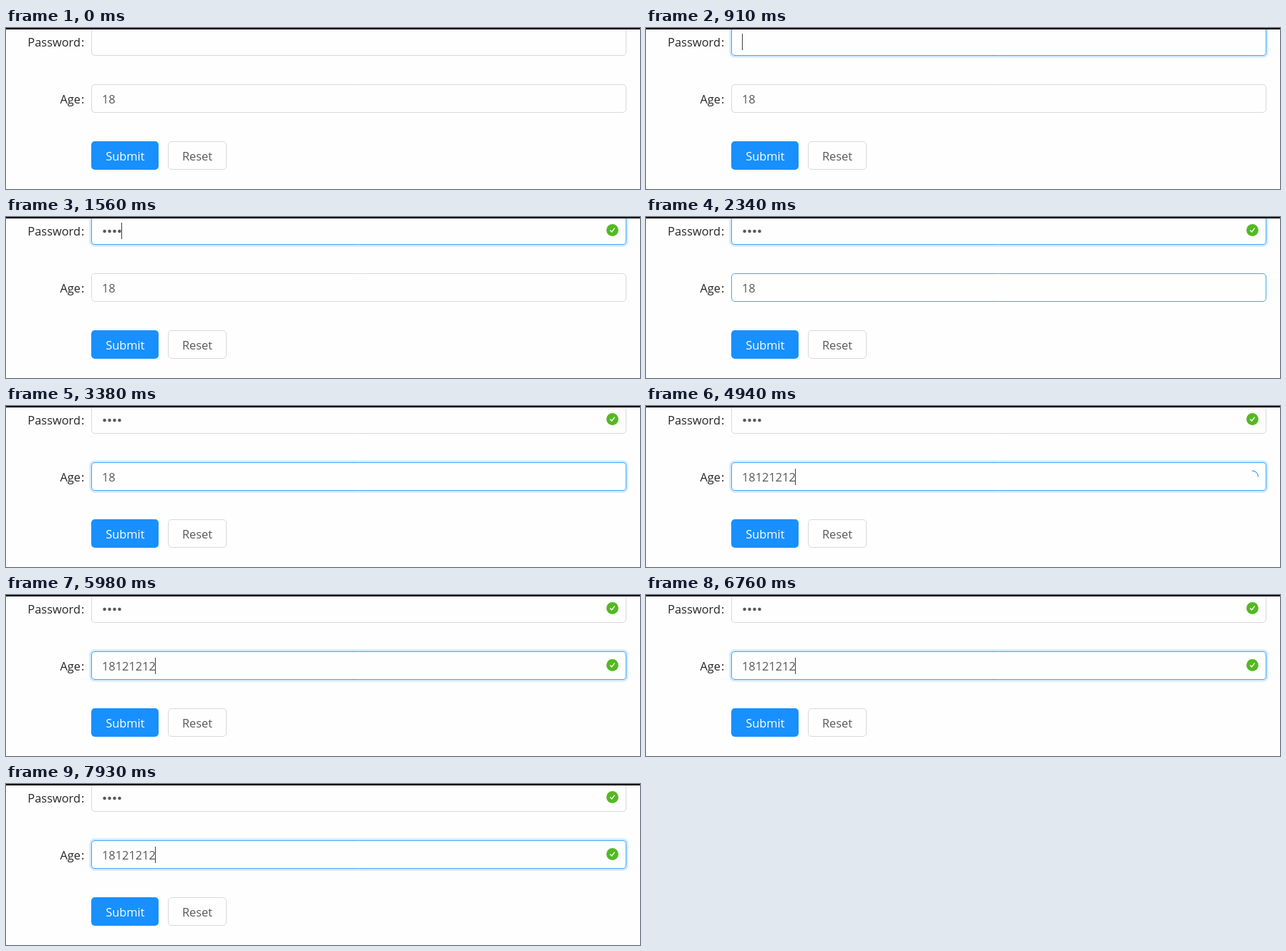
Recreate the animation shown at these times as an HTML page with a canvas. Size 885 px wide and 226 px high, loop 8 s.

```html
<!DOCTYPE html>
<html lang="en">
<head>
<meta charset="utf-8">
<title>Form</title>
<style>
  html, body { margin: 0; width: 885px; height: 226px; overflow: hidden; background: #fefefe; }
  canvas { display: block; }
</style>
</head>
<body>
<canvas id="stage" width="885" height="226"></canvas>
<script>
const ctx = document.getElementById('stage').getContext('2d');
const LOOP = 8000, TICK = 130, BLINK = 530, FADE = 300;
const FONT = '16.4px "Open Sans", "Noto Sans", sans-serif';
const GREY = [217, 217, 217], BLUE = [64, 169, 255];
const INK = '#595959', LABEL = '#262626';

// key times
const PASS = { hover: 380, focus: 600, blur: 2722, keys: [1160, 1290, 1420, 1550] };
const AGE = { hover: 2060, focus: 2722, blur: Infinity, keys: [3940, 4080, 4220, 4360, 4500, 4640] };
const VALID_AGE = 5640;

const clamp = v => Math.min(1, Math.max(0, v));
const ramp = (t, start) => 1 - (1 - clamp((t - start) / FADE)) ** 3;
const mix = (a, b, k) => `rgb(${a.map((v, i) => Math.round(v + (b[i] - v) * k))})`;
const typed = (t, keys) => keys.filter(k => k <= t).length;

function zoom(t, start) {
  const u = clamp((t - start) / FADE) - 1;
  return 1 + 2.7 * u ** 3 + 1.7 * u ** 2;
}

function text(str, x, y, color, align = 'left') {
  ctx.font = FONT;
  ctx.textAlign = align;
  ctx.fillStyle = color;
  ctx.fillText(str, x, y);
}

function box(x, y, w, h, r) {
  ctx.beginPath();
  ctx.roundRect(x, y, w, h, r);
}

function label(str, y) {
  text(str, 104, y, LABEL, 'right');
  text(':', 105, y, LABEL);
}

function field(t, y, f) {
  const off = ramp(t, f.blur);
  const glow = ramp(t, f.focus) * (1 - off);
  const tint = ramp(t, f.hover) * (1 - off);
  if (glow > 0) {
    box(116.5, y - 2.5, 752, 45, 7);
    ctx.fillStyle = `rgba(24,144,255,${0.2 * glow})`;
    ctx.fill();
  }
  box(119.5, y + 0.5, 746, 39, 4.5);
  ctx.fillStyle = '#fefefe';
  ctx.fill();
  ctx.lineWidth = 1;
  ctx.strokeStyle = mix(GREY, BLUE, tint);
  ctx.stroke();
}

function caret(t, f, x, y) {
  if (t < f.focus || t >= f.blur) return;
  const last = Math.max(f.focus, ...f.keys.filter(k => k <= t));
  if (Math.floor((t - last) / BLINK) % 2) return;
  ctx.fillStyle = '#404040';
  ctx.fillRect(Math.round(x), y, 1, 23);
}

function check(t, start, y) {
  if (t < start) return;
  const s = zoom(t, start);
  if (s <= 0) return;
  ctx.save();
  ctx.translate(846.5, y);
  ctx.scale(s, s);
  ctx.fillStyle = '#54b824';
  ctx.beginPath();
  ctx.arc(0, 0, 8.4, 0, 7);
  ctx.fill();
  ctx.strokeStyle = '#fff';
  ctx.lineWidth = 1.4;
  ctx.beginPath();
  ctx.moveTo(-3.2, 0);
  ctx.lineTo(-0.9, 2.5);
  ctx.lineTo(3.2, -2.9);
  ctx.stroke();
  ctx.restore();
}

function spinner(t, start, end, y) {
  if (t < start || t >= end) return;
  const s = Math.max(0, zoom(t, start));
  const a = (t - start) / 1000 * 2 * Math.PI;
  ctx.strokeStyle = '#4ba6f5';
  ctx.lineWidth = 1.3;
  ctx.lineCap = 'round';
  ctx.beginPath();
  ctx.arc(846.5, y, 8 * s, a - Math.PI / 2, a);
  ctx.stroke();
  ctx.lineCap = 'butt';
}

function password(t) {
  label('Password', 26);
  field(t, -1, PASS);
  const n = typed(t, PASS.keys);
  ctx.fillStyle = INK;
  for (let i = 0; i < n; i++) {
    ctx.beginPath();
    ctx.arc(137.6 + 6.95 * i, 20, 2.3, 0, 7);
    ctx.fill();
  }
  caret(t, PASS, 134 + 6.8 * n, 8);
  check(t, PASS.keys[0], 18.5);
}

function age(t) {
  label('Age', 106);
  field(t, 79, AGE);
  const value = '18' + '121212'.slice(0, typed(t, AGE.keys));
  text(value, 134, 106, INK);
  caret(t, AGE, 133.5 + ctx.measureText(value).width, 88);
  spinner(t, AGE.keys[0], VALID_AGE, 99);
  check(t, VALID_AGE, 98.5);
}

function buttons() {
  box(119, 159, 94, 40, 5);
  ctx.fillStyle = '#1890ff';
  ctx.fill();
  text('Submit', 166.3, 186, '#fff', 'center');
  box(226.5, 159.5, 81, 39, 4.5);
  ctx.lineWidth = 1;
  ctx.strokeStyle = mix(GREY, BLUE, 0);
  ctx.stroke();
  text('Reset', 267, 186, INK, 'center');
}

function draw(now) {
  const t = Math.floor((now % LOOP) / TICK) * TICK;
  ctx.fillStyle = '#fefefe';
  ctx.fillRect(0, 0, 885, 226);
  password(t);
  age(t);
  buttons();
  ctx.fillStyle = '#000';
  ctx.fillRect(0, 0, 885, 2);
}

let begin;
function tick(now) {
  begin ??= now;
  draw(now - begin);
  requestAnimationFrame(tick);
}
draw(0);
requestAnimationFrame(tick);
</script>
</body>
</html>
```
